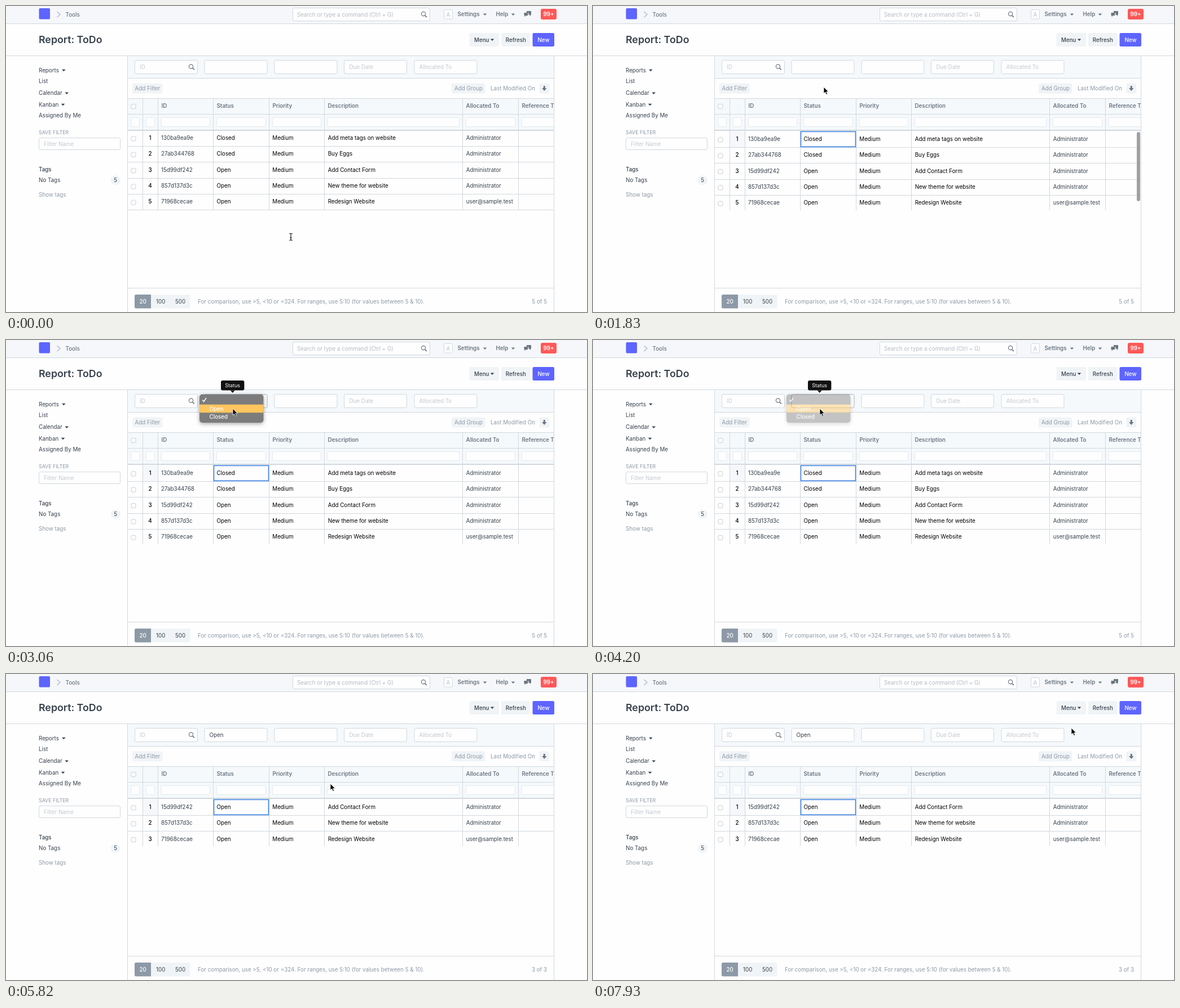
Animation, 1030 px wide and 544 px high, one loop 8 s. Source, as an HTML page:

```html
<!DOCTYPE html>
<html lang="en">
<head>
<meta charset="utf-8">
<title>Report list filter</title>
<style>
  html, body { margin: 0; width: 100%; height: 100%; overflow: hidden; background: #fefefe; }
  svg { display: block; width: 100vw; height: 100vh; font-family: Inter, "Open Sans", sans-serif; }
  text { white-space: pre; }
</style>
</head>
<body>
<svg id="stage" viewBox="0 0 1030 544"></svg>
<script>
const LOOP = 8000;
const INK = '#36414c', DIM = '#8d99a6', HEAD = '#6c7680', LINE = '#d1d8dd', PALE = '#c3cad0',
      BTN = '#f0f4f7', BAR = '#f5f9fc', BLUE = '#5e64ff', PAGE = '#fefefe';
const ROW = 28.35;
const COLS = [242.5, 269.5, 367.5, 466.5, 564.5, 809.5, 908.5];

const text = (x, y, s, { c = INK, w = 400, size = 9.8, a = 'start' } = {}) =>
  `<text x="${x}" y="${y + size * 0.36}" fill="${c}" font-weight="${w}" font-size="${size}" text-anchor="${a}">${s}</text>`;
const rect = (x, y, x2, y2, fill, { r = 0, s = 'none', sw = 1 } = {}) =>
  `<rect x="${x}" y="${y}" width="${x2 - x}" height="${y2 - y}" rx="${r}" fill="${fill}" stroke="${s}" stroke-width="${sw}"/>`;
const line = (x, y, x2, y2, c = LINE, w = 1) =>
  `<path d="M${x} ${y}L${x2} ${y2}" stroke="${c}" stroke-width="${w}"/>`;
const field = (x, y, x2, y2) => rect(x, y, x2, y2, PAGE, { r: 2.5, s: LINE });
const caret = (x, y, c = INK) => `<path d="M${x - 3.3} ${y - 1.6}h6.6l-3.3 3.6z" fill="${c}"/>`;
const lens = (x, y) =>
  `<g fill="none" stroke="${HEAD}"><circle cx="${x - 1}" cy="${y - 1}" r="3.6" stroke-width="1.2"/><path d="M${x + 1.8} ${y + 1.8}l3 3" stroke-width="1.8"/></g>`;
const box = (x, y) => rect(x - 4, y - 4, x + 4, y + 4, PAGE, { r: 1.5, s: '#c8cdd2' });
const button = (x, x2, y, y2, fill) => rect(x, y, x2, y2, fill, { r: 2.5 });

function navbar() {
  return rect(0, 0, 1030, 32, '#f5f7fa') + line(0, 31.5, 1030, 31.5) +
    rect(58.5, 4, 78, 23.5, BLUE, { r: 2 }) +
    `<path d="M90.5 10l5.5 5-5.5 5" fill="none" stroke="#b3bcc5" stroke-width="1.4"/>` +
    text(105.5, 15, 'Tools', { c: HEAD, w: 500 }) +
    field(508.5, 3.5, 751.5, 26.5) + lens(741, 15) +
    text(516, 15.3, 'Search or type a command (Ctrl + G)', { c: '#b4bcc4' }) +
    rect(776.5, 6.5, 791.5, 23, PAGE, { r: 2, s: LINE }) +
    text(784, 15, 'A', { c: '#b8c2cc', a: 'middle' }) +
    text(800.5, 14.8, 'Settings', { c: HEAD, w: 600 }) + caret(849, 15, HEAD) +
    text(868.5, 14.8, 'Help', { c: HEAD, w: 600 }) + caret(899, 15, HEAD) +
    `<path d="M923 9h8v6.5h-1v2.5l-2.3-2.5h-1.2v-3.2h-3.5z" fill="${HEAD}"/>` +
    `<path d="M918.5 12h6.7v5h-3.4l-2.2 2.4v-2.4h-1.1z" fill="${HEAD}"/>` +
    rect(948, 5, 976, 24, '#ff5858', { r: 3 }) +
    text(962, 14.8, '99+', { c: '#fff', w: 600, a: 'middle' });
}

function pageHead() {
  return text(58, 60, 'Report: ToDo', { w: 600, size: 17.8 }) +
    button(821.5, 874, 48, 72, BTN) + text(830, 60, 'Menu', { w: 500 }) + caret(862, 60) +
    button(878, 929.5, 48, 72, BTN) + text(903.8, 60, 'Refresh', { w: 500, a: 'middle' }) +
    button(933.5, 972, 48, 72, BLUE) + text(953, 60, 'New', { c: '#fff', w: 500, a: 'middle' }) +
    line(0, 88.5, 1030, 88.5);
}

function sidebar() {
  return text(58, 114, 'Reports') + caret(102.3, 114.3) + text(58, 133.5, 'List') +
    text(58, 154.7, 'Calendar') + caret(107.7, 155) + text(58, 175, 'Kanban') + caret(101, 175.3) +
    text(58, 194.7, 'Assigned By Me') +
    text(58, 225, 'SAVE FILTER', { c: DIM, size: 8.8 }) +
    field(58.5, 234.5, 202.5, 255.5) + text(67, 245.5, 'Filter Name', { c: PALE }) +
    text(58, 290.5, 'Tags', { w: 500 }) + text(58, 309.5, 'No Tags') +
    rect(185.5, 301.5, 203, 318, BTN, { r: 8.2 }) + text(194.2, 309.5, '5', { a: 'middle' }) +
    text(58, 335.5, 'Show tags', { c: DIM });
}

function filters() {
  return rect(216, 89, 971, 128.5, BAR) + line(216, 128.5, 971, 128.5) +
    [228.5, 352, 476, 599.5, 724].map(x => field(x, 96.5, x + 111, 120.5)).join('') +
    text(237, 108.7, 'ID', { c: PALE }) + lens(329, 108.5) +
    text(608.5, 108.7, 'Due Date', { c: PALE }) + text(732.5, 108.7, 'Allocated To', { c: PALE }) +
    button(224, 277.5, 137.5, 155.5, BTN) + text(228.5, 146.5, 'Add Filter', { c: DIM }) +
    button(790, 849.5, 137.5, 155.5, BTN) + text(795, 146.5, 'Add Group', { c: DIM }) +
    text(859, 146.5, 'Last Modified On', { c: DIM }) +
    button(945.5, 963.5, 137.5, 155.5, BTN) +
    `<path d="M952.8 142h3v4h2.7l-4.2 5-4.2-5h2.7z" fill="${HEAD}"/>`;
}

function tableHead() {
  const edges = [216, ...COLS, 990];
  const titles = ['ID', 'Status', 'Priority', 'Description', 'Allocated To', 'Reference Type'];
  return `<g clip-path="url(#table)">` + rect(216, 164, 971, 221, BAR) +
    [164.5, 192.5].map(y => line(216, y, 971, y)).join('') +
    COLS.map(x => line(x, 164, x, 221)).join('') +
    edges.slice(0, -1).map((x, i) =>
      rect(x + 5.9, 198.5, edges[i + 1] - 6, 214.5, PAGE, { r: 2, s: '#e3e9ee' })).join('') +
    titles.map((s, i) => text(COLS[i + 1] + 6, 177.5, s, { c: HEAD, w: 600 })).join('') +
    box(226, 178.5) + line(216, 221, 971, 221, LINE, 2) + `</g>`;
}

function footer() {
  return line(216, 501.5, 971, 501.5) + button(228, 326.5, 513, 537.5, BTN) +
    `<path d="M257 513v24.5h-26.5a2.5 2.5 0 0 1-2.5-2.5v-19.5a2.5 2.5 0 0 1 2.5-2.5z" fill="${DIM}"/>` +
    text(242.7, 525.3, '20', { c: '#fff', w: 500, a: 'middle' }) +
    text(274.3, 525.3, '100', { a: 'middle' }) + text(309, 525.3, '500', { a: 'middle' }) +
    text(340, 525.3, 'For comparison, use &gt;5, &lt;10 or =324. For ranges, use 5:10 (for values between 5 &amp; 10).', { c: DIM });
}

const DATA = [
  ['130ba9ea9e', 'Closed', 'Add meta tags on website'],
  ['27ab344768', 'Closed', 'Buy Eggs'],
  ['15d99df242', 'Open', 'Add Contact Form'],
  ['857d137d3c', 'Open', 'New theme for website'],
  ['71968cecae', 'Open', 'Redesign Website', 'user@sample.test']
];

function tableBody(list, focused) {
  const top = 220.95 + (focused ? 2 : 0), end = 221.3 + ROW * list.length;
  const black = { c: '#000' };
  let out = `<clipPath id="body"><rect x="216" y="222" width="755" height="${end - 222}"/></clipPath><g clip-path="url(#body)">`;
  if (focused) out += rect(242.5, top, 269.5, top + ROW, '#f5f7fa');
  list.forEach(([id, status, task, owner = 'Administrator'], i) => {
    const y = top + ROW * i, mid = y + 13.4, low = Math.floor(y + ROW) + 0.5;
    out += line(216, low, 971, low) + box(226, mid + 1.5) +
      text(255.5, mid, i + 1, { c: '#000', w: 500, a: 'middle' }) +
      text(275, mid, id) + text(373.5, mid, status, black) + text(472.3, mid, 'Medium', black) +
      text(570.7, mid, task, black) + text(815.7, mid, owner);
  });
  out += COLS.map(x => line(x, 221, x, end)).join('');
  if (focused) out += rect(368.5, 223.3, 465.5, 250.3, 'none', { s: '#4a8be8', sw: 1.7 });
  return out + '</g>';
}

const tooltip = (id, cx, half, label) =>
  `<g id="${id}">` + rect(cx - half, 72, cx + half, 89.5, '#111', { r: 3 }) +
  `<path d="M${cx - 4} 89.5h8l-4 4.5z" fill="#111"/>` +
  text(cx, 80.7, label, { c: '#fff', size: 9, a: 'middle' }) + '</g>';

const popup = () =>
  `<g id="popup"><g filter="url(#shade)">${rect(343, 96.5, 456.5, 147, '#7c7c7c', { r: 5 })}</g>` +
  `<rect id="hot" x="343" width="113.5" height="14.5" fill="#ffc55f"/>` +
  `<path d="M348.3 106.5l2.4 3 4.3-6.5" fill="none" stroke="#fff" stroke-width="1.5"/>` +
  text(360.5, 122, 'Open', { c: '#fff', w: 500 }) + text(360.5, 136, 'Closed', { c: '#fff', w: 500 }) + '</g>';

const stage = document.getElementById('stage');
stage.innerHTML =
  `<defs><clipPath id="table"><rect x="216" y="164" width="755" height="60"/></clipPath>
  <filter id="shade" x="-20%" y="-50%" width="140%" height="200%"><feDropShadow dx="0" dy="2" stdDeviation="3.5" flood-opacity=".35"/></filter></defs>` +
  rect(0, 0, 1030, 544, PAGE) + navbar() + pageHead() + sidebar() + filters() +
  `<g id="rows"></g>` + tableHead() +
  line(215.5, 88, 215.5, 544) + line(971.5, 88, 971.5, 544) + footer() +
  `<text id="count" x="959" y="528.8" font-size="9.8" text-anchor="end" fill="${DIM}"></text>` +
  `<g id="focus">${rect(352, 96.5, 463, 120.5, 'none', { r: 2.5, s: '#b9c0c6' })}${line(353, 97.5, 462, 97.5, '#dfe3e6')}</g>` +
  `<g id="chosen">${text(360.5, 108.5, 'Open')}</g>` +
  `<g id="bar">${rect(964, 224, 970, 347, '#a0a0a0', { r: 3 })}</g>` +
  tooltip('tipStatus', 401.7, 20.7, 'Status') + tooltip('tipPriority', 526, 21.8, 'Priority') + popup() +
  `<g id="beam" fill="none" stroke-linecap="round"><path d="M-2.5 -6q2.5 0 2.5 1.5V4.5q0 1.5 -2.5 1.5M2.5 -6q-2.5 0 -2.5 1.5M0 4.5q0 1.5 2.5 1.5M-1.5 1.5h3" stroke="#222" stroke-width="1.2"/></g>` +
  `<path id="arrow" d="M0 0v11.6l2.7-2.5 1.9 4.3 2-.9-1.9-4.1h3.7z" fill="#000" stroke="#fff" stroke-width=".8"/>`;

const $ = Object.fromEntries([...stage.querySelectorAll('[id]')].map(e => [e.id, e]));

// Pointer hops: start time, interval, x y pairs
const HOPS = [
  [0, 0, '505 410.5'],
  [480, 0, '495 368.5'],
  [650, 118, '478 340, 455 310, 432 284, 414 264, 400 250, 388 241, 385 238'],
  [1600, 115, '390 205, 402 170, 409 144, 408 128, 405 119.5'],
  [2210, 0, '403 110'],
  [2360, 0, '403 108'],
  [2600, 115, '403 111, 403 115, 403 119, 402 121, 402 122'],
  [4580, 120, '436 100, 471 80'],
  [4850, 0, '484 70'],
  [5470, 118, '497 92, 530 140, 575 195, 612 240, 620 262, 590 267, 540 256'],
  [6300, 110, '530 252, 525 250'],
  [6650, 115, '535 230, 560 200, 581 174, 578 118, 622 132, 700 142, 789 156'],
  [7460, 117, '815 150, 832 132, 842 115, 847 102, 848 96']
].flatMap(([t, dt, path]) => path.split(', ').map((p, i) => [t + dt * i, ...p.split(' ').map(Number)]));

const show = (el, o) => el.setAttribute('opacity', +o);
const within = (t, a, b) => t >= a && t < b;
let rowState = '';

function render(t) {
  const focused = t >= 1240, filtered = t >= 4700, state = `${focused}${filtered}`;
  if (state !== rowState) {
    rowState = state;
    const list = filtered ? DATA.filter(d => d[1] === 'Open') : DATA;
    $.rows.innerHTML = tableBody(list, focused);
    $.count.textContent = `${list.length} of ${list.length}`;
  }

  const [, x, y] = HOPS.findLast(h => h[0] <= t);
  const beam = t < 650;
  show($.beam, beam);
  show($.arrow, !beam);
  (beam ? $.beam : $.arrow).setAttribute('transform', `translate(${x} ${y})`);

  show($.bar, within(t, 1240, 1945) ? 1 : within(t, 1945, 2060) ? 0.5 : 0);
  show($.tipStatus, within(t, 2210, 4580) ? 1 : within(t, 4580, 4700) ? 0.5 : 0);
  show($.tipPriority, within(t, 6995, 7460));
  show($.popup, within(t, 2360, 4200) ? 1 : within(t, 4200, 4315) ? 0.45 : within(t, 4315, 4430) ? 0.2 : 0);
  $.hot.setAttribute('y', t < 2715 ? 100.5 : 114.7);
  show($.focus, within(t, 2360, 5230));
  show($.chosen, t >= 4430);
}

const start = performance.now();
function tick() {
  render((performance.now() - start) % LOOP);
  requestAnimationFrame(tick);
}
tick();
</script>
</body>
</html>
```
